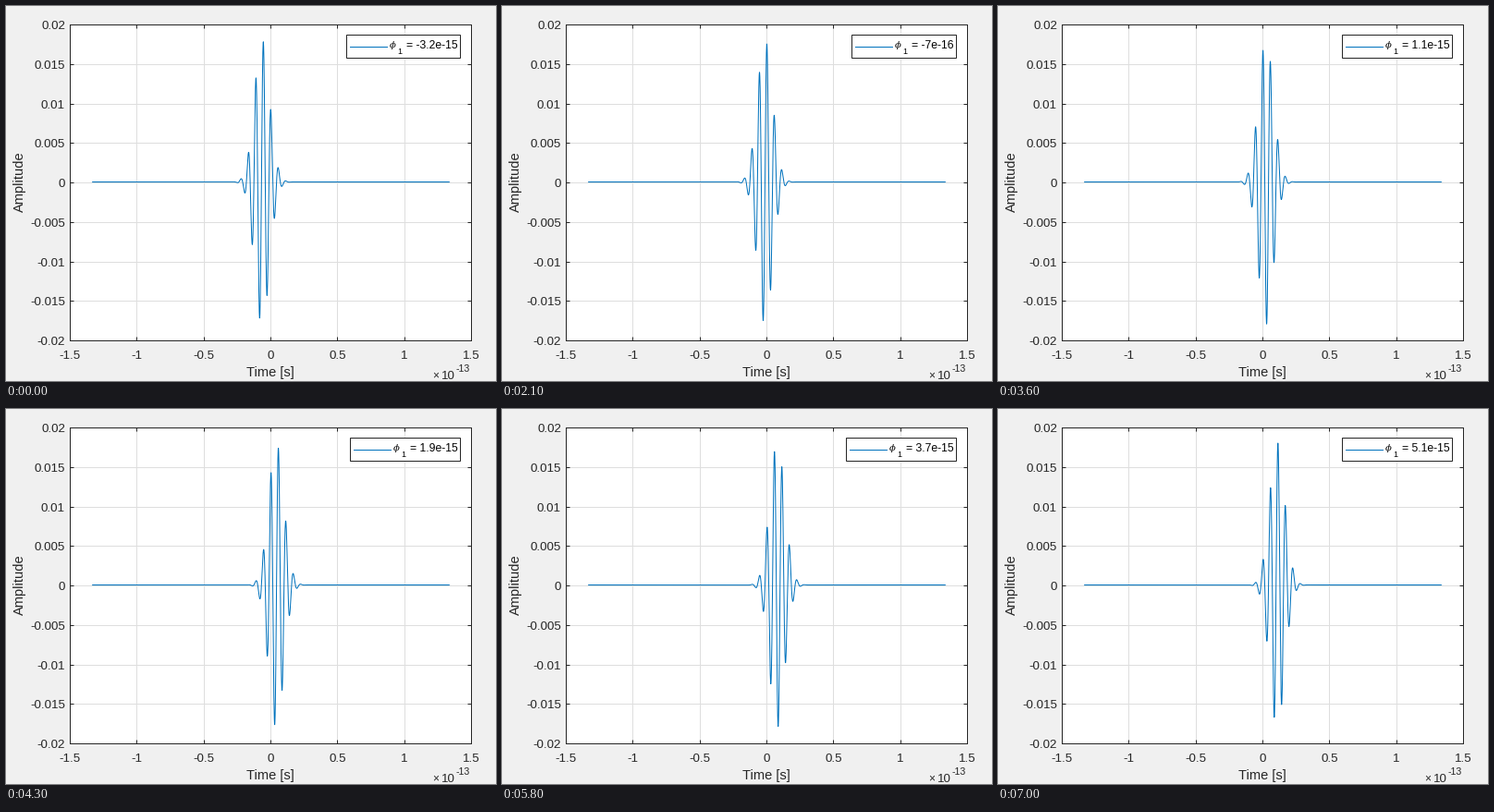
A matplotlib script that plays this animation: 530x406 px, repeating every 7100 ms.

```python
import numpy as np
import matplotlib.pyplot as plt
from matplotlib.animation import FuncAnimation
from matplotlib.patches import Rectangle
from matplotlib.transforms import Affine2D

W, H, DPI = 530, 406, 64
PX = 72 / DPI                       # one pixel in points
FRAMES, INTERVAL = 71, 100

INK, BLUE = "#262626", "#0072BD"
# Whole pixels: thin straight lines snap to the centre of the next pixel
LEFT, RIGHT, TOP, BOTTOM = 69, 503, 20, 362

# Pulse: fixed carrier under a Gaussian envelope that is delayed by the phase
PERIOD = 0.0563                     # in units of 1e-13 s
PEAK, DECAY = 0.01805, 0.49
DELAY = 0.3715                      # carrier periods per 1e-15 of phase
STEPS, ZERO_STEP = 83, 32

time = np.linspace(-1.333, 1.333, 6001)
cycles = time / PERIOD
carrier = PEAK * np.cos(2 * np.pi * cycles)

plt.rcParams["font.family"] = "Liberation Sans"
fig = plt.figure(figsize=(W / DPI, H / DPI), dpi=DPI, facecolor="#F0F0F0")

ax = fig.add_axes([LEFT / W, 1 - BOTTOM / H, (RIGHT - LEFT) / W, (BOTTOM - TOP) / H])
ax.set(xlim=(-1.5, 1.5), ylim=(-0.02, 0.02),
       xticks=np.linspace(-1.5, 1.5, 7), yticks=np.linspace(-0.02, 0.02, 9))
ax.set_axisbelow(True)
ax.grid(color="#DEDEDE", linewidth=PX)
ax.tick_params(direction="in", top=True, right=True, length=4.3 * PX, width=PX,
               color=INK, labelbottom=False, labelleft=False)
for spine in ax.spines.values():
    spine.set(color=INK, linewidth=PX)

# The curve is not snapped, so it gets the same half pixel explicitly
half_pixel = Affine2D().translate(0.5, 0.5)
pulse, = ax.plot([], [], color=BLUE, linewidth=PX, transform=ax.transData + half_pixel)

# Overlay in pixel coordinates, y pointing down
page = fig.add_axes([0, 0, 1, 1])
page.set(xlim=(0, W), ylim=(H, 0))
page.axis("off")


def write(x, y, text, size, color=INK, ha="left", **kw):
    return page.text(x, y, text, fontsize=size * PX, color=color, ha=ha,
                     va="baseline", **kw)


for i in range(7):
    x = LEFT + 0.5 + (RIGHT - LEFT) * i / 6
    write(x, 381.8, f"{-1.5 + 0.5 * i:g}", 13.33, ha="center")
for i in range(9):
    y = TOP + (BOTTOM - TOP) * i / 8
    write(64, y + 5.2, f"{(4 - i) * 0.005:g}", 13.33, ha="right")

write(286.2, 401.3, "Time [s]", 14.67, ha="center")
write(19, 190.5, "Amplitude", 14.67, ha="center", rotation=90, rotation_mode="anchor")
write(461.3, 403.7, "×", 12)
write(471, 403.7, "10", 13.33)
write(486.5, 396, "-13", 10.67)

# Legend
box = page.add_patch(Rectangle((368, 31), 123, 25, facecolor="white",
                               edgecolor=INK, linewidth=PX))
sample, = page.plot([], [], color=BLUE, linewidth=PX)
phi = write(415, 45, "ϕ", 10, "black", family="DejaVu Serif", style="italic")
sub = write(423, 51.7, "1", 9, "black")
value = write(488.5, 45.8, "", 12.2, "black", ha="right")


def phase_text(tenths):
    if tenths == 0:
        return "0"
    if abs(tenths) < 10:
        return f"{tenths}e-16"
    return f"{tenths / 10:g}e-15"


def text_width(text):
    return sum({".": 3, "-": 4}.get(c, 7) for c in text)


def draw(n):
    # Phase advances at 12 steps per second, shown at 10 frames per second
    tenths = min(6 * n // 5, STEPS) - ZERO_STEP
    centre = DELAY * tenths / 10
    pulse.set_data(time, carrier * np.exp(-DECAY * (cycles - centre) ** 2))

    text = phase_text(tenths)
    left = 414 - text_width(text)
    box.set_bounds(left, 31, 491 - left, 25)
    sample.set_data([left + 4, left + 44], [44, 44])
    phi.set_x(left + 47)
    sub.set_x(left + 55)
    value.set_text(f"= {text}")
    return pulse, box, sample, phi, sub, value


anim = FuncAnimation(fig, draw, frames=FRAMES, interval=INTERVAL,
                     repeat=True, repeat_delay=0, cache_frame_data=False)
plt.show()
```
